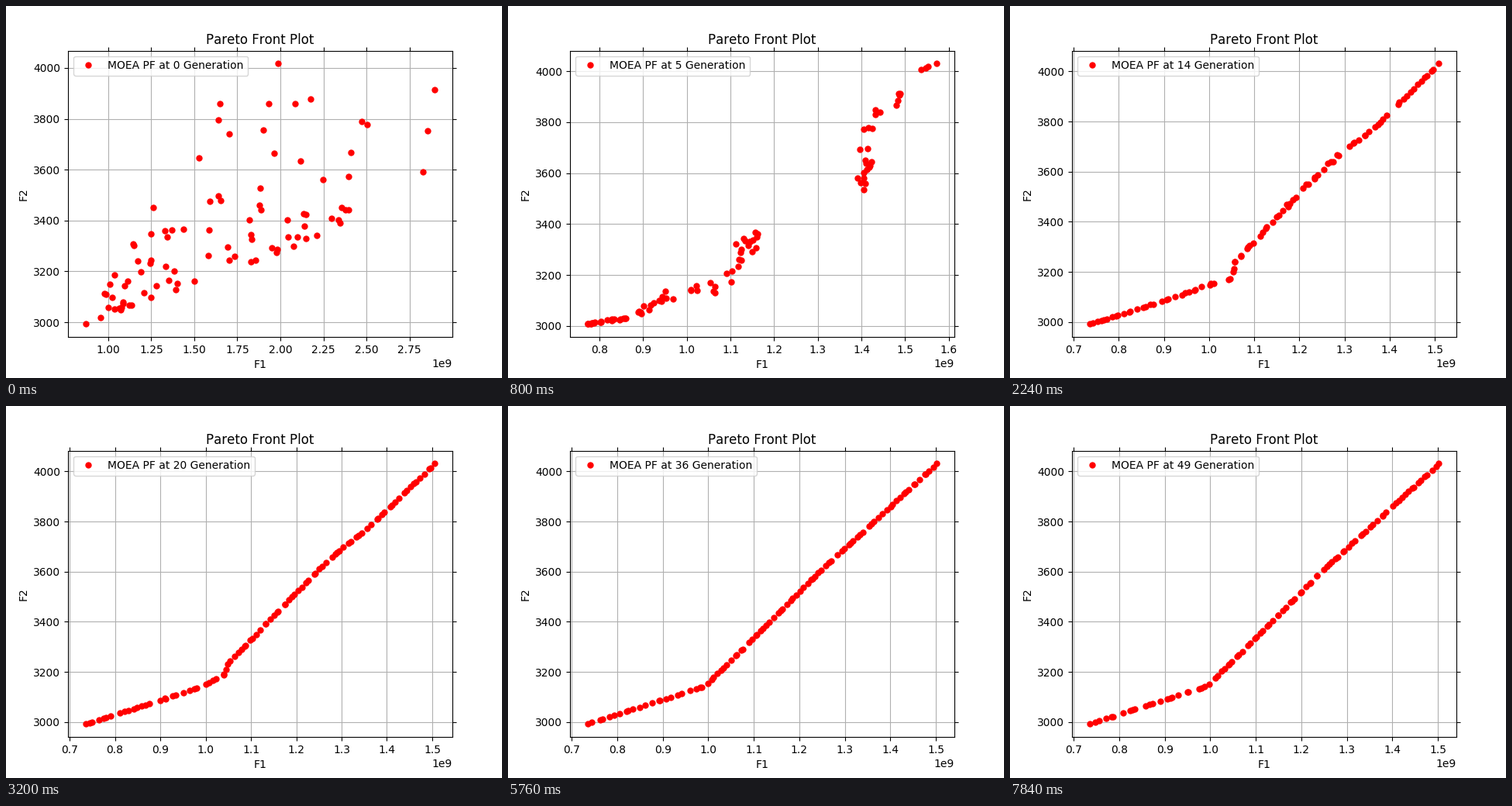
These frames come from a looping animation (640 by 480 pixels, 8 s). A matplotlib script:

```python
import numpy as np
import matplotlib.pyplot as plt
from matplotlib.animation import FuncAnimation

plt.rcParams["text.kerning_factor"] = 6

GENERATIONS = 50
INTERVAL = 160
SIZE = 92

# Corner points of the front while it straightens, as fractions of its extent
FRONTS = {
    5: [(0, 0), (0.13, 0.03), (0.24, 0.11), (0.39, 0.15), (0.44, 0.29),
        (0.53, 0.39), (0.65, 0.46), (0.79, 0.51), (0.81, 0.80), (0.87, 0.83),
        (0.94, 0.97), (1, 1)],
    8: [(0, 0), (0.31, 0.13), (0.44, 0.18), (0.46, 0.25), (0.56, 0.47),
        (0.74, 0.62), (0.86, 0.79), (1, 1)],
    14: [(0, 0), (0.19, 0.08), (0.41, 0.18), (0.41, 0.23), (0.59, 0.49),
         (0.71, 0.65), (0.82, 0.76), (1, 1)],
    27: [(0, 0), (0.336, 0.146), (0.438, 0.28), (0.664, 0.586),
         (0.827, 0.786), (1, 1)],
}

# generation: F1 low, F1 high, F2 low, F2 high
LIMITS = {
    0: (0.8681e9, 2.8978e9, 2993, 4017),
    5: (0.7722e9, 1.5731e9, 3007, 4030),
    8: (0.7425e9, 1.5245e9, 2993.5, 4031),
    14: (0.7352e9, 1.5092e9, 2991.5, 4031),
    27: (0.7346e9, 1.5022e9, 2991.5, 4031),
}


def unit(points):
    low, high = points.min(axis=0), points.max(axis=0)
    return (points - low) / (high - low)


def first_cloud():
    """Random start population: a rising lower edge with a skewed spread."""
    rng = np.random.default_rng(4)
    x = rng.beta(1.3, 2.2, SIZE)
    low = 0.5 * x
    y = low + (0.97 - low) * rng.beta(0.8, 1.8, SIZE) * np.minimum(1, 3 * x)
    points = np.vstack([np.column_stack([x, y])[3:],
                        [(0, 0), (0.55, 1), (1, 0.9)]])
    return points[np.argsort(points.sum(axis=1))]


def walk(corners, u):
    """Points at the fractions u of a polyline's length."""
    corners = np.array(corners)
    steps = np.abs(np.diff(corners, axis=0)).sum(axis=1)
    s = np.append(0, np.cumsum(steps)) / steps.sum()
    return np.column_stack([np.interp(u, s, col) for col in corners.T])


def positions(rng, clump):
    """Jittered spacing, drawn together into clumps in early generations."""
    u = (np.arange(SIZE) + rng.uniform(-0.6, 0.6, SIZE)) / (SIZE - 1)
    centres = rng.random(26)
    nearest = centres[np.abs(u[:, None] - centres).argmin(axis=1)]
    u = (u + clump * (nearest - u)).clip(0, 1) ** (1 + clump)
    u[0], u[-1] = 0, 1
    return u


def front(gen):
    rng = np.random.default_rng(gen)
    u = positions(rng, 1.6 * np.exp(-max(gen, 5) / 6))
    gens = list(FRONTS)
    weights = [np.interp(gen, gens, row) for row in np.eye(len(gens))]
    points = sum(w * walk(c, u) for w, c in zip(weights, FRONTS.values()))
    noise = rng.normal(0, 0.04 * np.exp(-gen / 5), points.shape)
    return points + noise * (4 * u * (1 - u))[:, None]


CLOUD = first_cloud()


def population(gen):
    # the first generations converge fastest
    t = 1 - max(0, 1 - gen / 5) ** 1.5
    points = unit(CLOUD + (front(gen) - CLOUD) * t)
    pace = 5 * t if gen < 5 else gen
    x0, x1, y0, y1 = (np.interp(pace, list(LIMITS), col)
                      for col in zip(*LIMITS.values()))
    return x0 + points[:, 0] * (x1 - x0), y0 + points[:, 1] * (y1 - y0)


fig, ax = plt.subplots(figsize=(6.4, 4.8), dpi=100)
line, = ax.plot([], [], "o", color="red", markersize=5, label=" ")
legend = ax.legend(loc="upper left")
ax.set_title("Pareto Front Plot")
ax.set_xlabel("F1")
ax.set_ylabel("F2")
ax.tick_params(top=True, right=True)
ax.grid(True)


def update(gen):
    line.set_data(*population(gen))
    legend.get_texts()[0].set_text(f"MOEA PF at {gen} Generation")
    ax.relim()
    ax.autoscale_view()
    return line, legend


anim = FuncAnimation(fig, update, frames=GENERATIONS, interval=INTERVAL,
                     repeat=True, repeat_delay=0)
plt.show()
```
